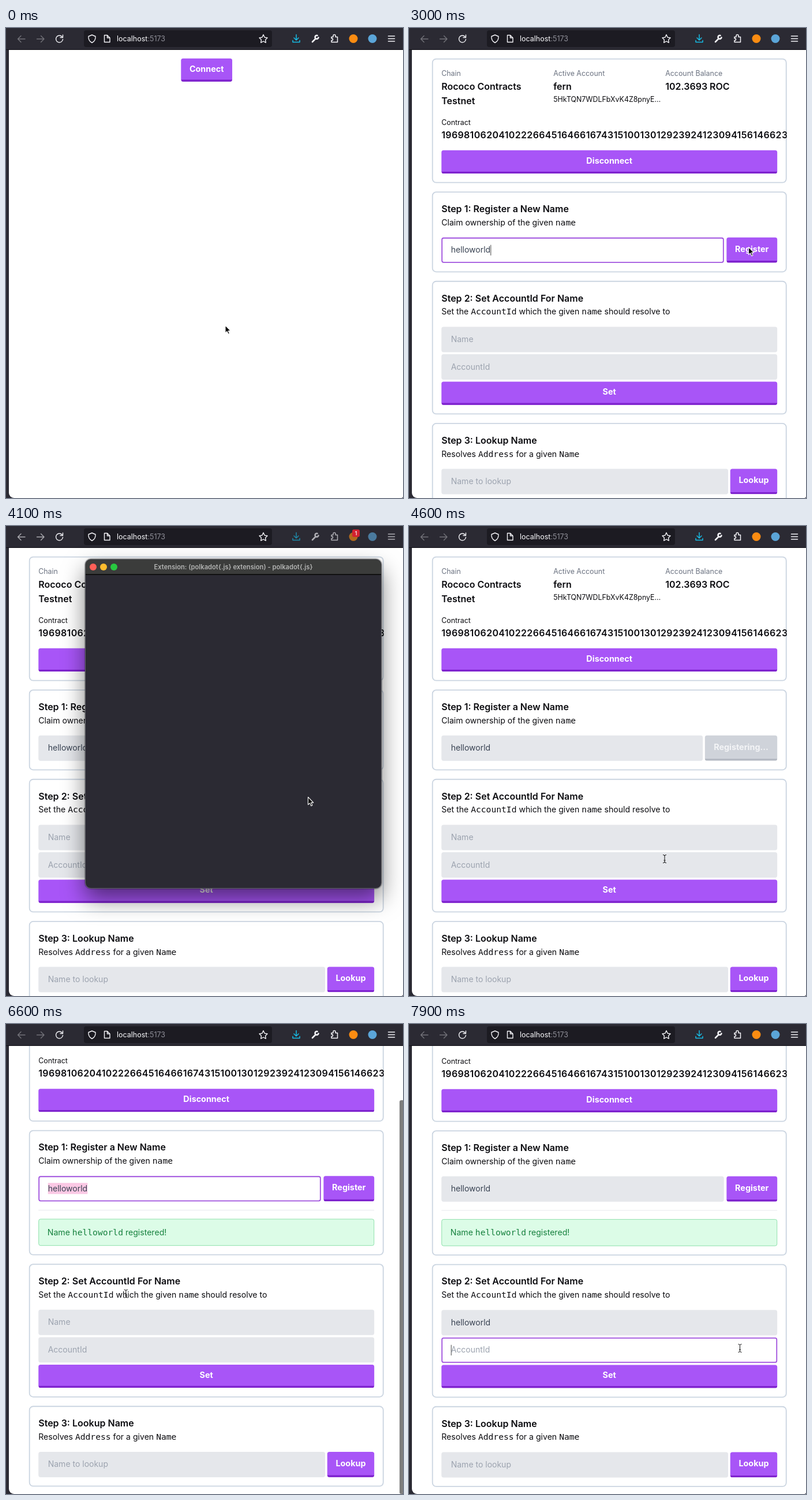
Recreate the animation shown at these times as an HTML page. Size 688 by 814 pixels, loop 8 s.

```html
<!DOCTYPE html>
<html lang="en">
<head>
<meta charset="utf-8">
<title>Name registry demo</title>
<style>
  html, body { margin: 0; width: 100%; height: 100%; overflow: hidden; background: #2b2a33; }
  #stage { position: relative; width: 688px; height: 814px; overflow: hidden; background: #2b2a33;
    font-family: Inter, "Open Sans", sans-serif; cursor: none; }
  #stage div, #stage svg { position: absolute; box-sizing: border-box; }
  .text { line-height: 30px; white-space: nowrap; }
  .mid { transform: translateX(-50%); }
  code { font: 16px/0 "DejaVu Sans Mono", monospace; }
  #bar { left: 0; top: 0; width: 688px; height: 38px; border-bottom: 1px solid #111016; }
  #url { left: 135px; top: 4px; width: 326px; height: 29px; border-radius: 4px; background: #1c1b22; }
  #page { left: 5px; top: 38px; width: 683px; height: 776px; overflow: hidden; background: #fff; border-radius: 0 0 3px 9px; }
  #doc { left: 0; top: 0; width: 748px; height: 0; transform-origin: 0 0; }
  #thumb { right: 0; width: 6px; height: 682px; border-radius: 3px 0 0 3px; background: #7d7d7d; }
  .card { left: 38px; width: 672px; border: 2px solid #cbd5e1; border-radius: 8px; }
  .button { background: #a855f7; border-bottom: 4px solid #7e22ce; border-radius: 4px; color: #fff; }
  .button.busy { background: #cfd3da; border-color: #b5bac3; color: #f3f4f6; }
  .field { left: 56px; height: 48px; background: #e5e7eb; border: 2px solid #e5e7eb; border-radius: 4px; }
  .field.focus { background: #fff; border-color: #a052de; }
  .field .text { left: 16px; top: 7px; font-size: 15.3px; color: #9ca3af; }
  .field .value { color: #374151; }
  .field .marked span { background: #fbc8e4; padding: 1px 0; }
  .caret { display: inline-block; width: 1px; height: 20px; margin-right: -1px; vertical-align: -5px; background: #333; }
  #popup { left: 137px; top: 57px; width: 514px; height: 571px; border-radius: 10px; overflow: hidden;
    background: #2b2a33; border: 1px solid #62646a; }
  #shadow { left: 137px; top: 57px; width: 514px; height: 571px; border-radius: 10px;
    box-shadow: 0 18px 38px rgba(0,0,0,.5), 0 0 2px #000; }
  #title { left: 0; top: 0; width: 100%; height: 27px; background: #3b3c3b; border-bottom: 2px solid #111; }
  .light { width: 12px; height: 12px; border-radius: 50%; top: 7px; }
</style>
</head>
<body>
<div id="stage"></div>
<script>
const INK = '#0b0b0f', GREY = '#6b7280', LOOP = 8000;
const SCALE = .915, RIGHT = 692, SHIFT = 84;
const SMALL = 13.55, BODY = 15.4, HEAD = 17.5;
const stage = document.getElementById('stage');

function box(parent, props = {}, style = {}) {
  const el = Object.assign(document.createElement('div'), props);
  for (const k in style) el.style[k] = typeof style[k] === 'number' ? style[k] + 'px' : style[k];
  return parent.appendChild(el);
}

// y is the middle of the capitals
function text(parent, x, y, size, html, color = INK, weight = 400, mid = false) {
  return box(parent, { className: mid ? 'text mid' : 'text', innerHTML: html },
    { left: x, top: y - 15, fontSize: size, color, fontWeight: String(weight) });
}

const head = (x, y, html) => text(app, x, y, HEAD, html, INK, 600);

function card(parent, top, height, title, note) {
  const el = box(parent, { className: 'card' }, { top, height });
  if (title) {
    text(parent, 56, top + 33, HEAD, title, INK, 600);
    text(parent, 56, top + 58.7, BODY, note);
  }
  return el;
}

function button(parent, left, right, top, height, label) {
  const el = box(parent, { className: 'button' }, { left, top, width: right - left, height });
  const caption = text(el, 0, (height - 4) / 2 + .4, 15.7, label, 'inherit', 700, true);
  caption.style.left = '50%';
  return {
    el,
    set(left, label, busy) {
      el.style.left = left + 'px';
      el.style.width = right - left + 'px';
      el.classList.toggle('busy', busy);
      caption.textContent = label;
    }
  };
}

function field(parent, top, right, hint) {
  const el = box(parent, { className: 'field' }, { top, width: right - 56 });
  const line = box(el, { className: 'text', textContent: hint });
  return {
    el,
    set(value, focus, marked) {
      const caret = focus && !marked ? '<i class="caret"></i>' : '';
      el.classList.toggle('focus', focus);
      line.className = 'text' + (value ? ' value' : '') + (marked ? ' marked' : '');
      line.innerHTML = value ? `<span>${value}</span>${caret}` : caret + hint;
    }
  };
}

function svg(parent, w, h, body) {
  const holder = box(parent, {}, { left: 0, top: 0, width: w, height: h });
  holder.innerHTML = `<svg width="${w}" height="${h}" fill="none" style="overflow:visible">${body}</svg>`;
  return holder;
}

// Browser toolbar
const bar = box(stage, { id: 'bar' });
box(bar, { id: 'url' });
text(bar, 192, 19, 12.5, 'localhost<span style="color:#8f8f98">:5173</span>', '#fbfbfe');
const arrows = svg(bar, 688, 38, `<g stroke="#fbfbfe" stroke-width="1.4" stroke-linecap="round" stroke-linejoin="round">
  <path d="M33 19H20.5M26 13.5L20.5 19L26 24.5M53.5 19H66M60.5 13.5L66 19L60.5 24.5"/></g>`);
svg(bar, 688, 38, `<g stroke="#f4f4f8" stroke-width="1.4" stroke-linecap="round" stroke-linejoin="round">
  <path d="M97 15A6 6 0 1 0 98.5 19.5M98.5 12V16.5H94"/>
  <path d="M149 12L155 14.5C155.5 20 153 23.5 149 25.5C145 23.5 142.5 20 143 14.5Z"/>
  <path d="M170.5 12.5H175.5L180 17V24.5H170.5ZM175.5 12.5V17H180"/>
  <path d="M446 11.5L448.2 16.2L453 16.9L449.5 20.4L450.3 25.3L446 23L441.7 25.3L442.5 20.4L439 16.9L443.8 16.2Z"/></g>`);
const tools = svg(bar, 688, 38, `<g stroke="#f4f4f8" stroke-width="1.5" stroke-linecap="round" stroke-linejoin="round">
  <path stroke="#17bde6" d="M503 11.5V20.5M499 17L503 21L507 17M497 21.5V24.5H509V21.5"/>
  <path stroke-width="2.6" d="M531 24L536.5 18.5M539.5 13A3 3 0 1 0 541.5 16.5"/>
  <path d="M564 15.5H567V13.5A2 2 0 0 1 571 13.5V15.5H574.5V24.5H564V21.5H565.5A2 2 0 0 0 565.5 18H564Z"/>
  <path d="M662.5 14H673.5M662.5 18.5H673.5M662.5 23H673.5"/></g>
  <circle cx="602" cy="18.5" r="7.5" fill="#fb8c12"/><circle cx="635" cy="18.5" r="7.5" fill="#5ba5d8"/>`);
const badge = box(bar, {}, { left: 600, top: 6, width: 13, height: 13, borderRadius: '3px', background: '#d32230' });
text(badge, 6.5, 6.5, 9.5, '1', '#fff', 500, true);

// Web page, laid out in its own pixels and scaled down
const page = box(stage, { id: 'page' });
const doc = box(page, { id: 'doc' });
const thumb = box(page, { id: 'thumb' });
const connect = button(doc, 326, 423, 16, 44, 'Connect');
const app = box(doc);

card(app, 16, 236);
text(app, 56, 44.3, SMALL, 'Chain', GREY);
head(56, 69, 'Rococo Contracts');
head(56, 97, 'Testnet');
text(app, 268, 44.3, SMALL, 'Active Account', GREY);
head(268, 69, 'fern');
text(app, 268, 92.8, SMALL, '5HkTQN7WDLFbXvK4Z8pnyE…');
text(app, 480, 44.3, SMALL, 'Account Balance', GREY);
const balance = head(480, 69, '');
text(app, 56, 136.6, SMALL, 'Contract');
const id = head(56, 161, '1969810620410222664516466167431510013012923924123094156146623');
Object.assign(id.style, { width: '654px', overflow: 'hidden', letterSpacing: '.02em' });
button(app, 56, RIGHT, 190, 44, 'Disconnect');

const registerCard = card(app, 268, 153, 'Step 1: Register a New Name',
  'Claim ownership of the given <code>name</code>');
const nameField = field(app, 355, 591, 'Name to register');
const register = button(app, 596, RIGHT, 355, 48, 'Register');

const notice = box(app);
box(notice, {}, { left: 56, top: 419, width: 636, height: 1, background: '#e5e7eb' });
box(notice, {}, { left: 56, top: 436, width: 636, height: 51, borderRadius: '4px',
  background: '#dcfce7', border: '1px solid #86dfa6' });
text(notice, 73, 461.5, BODY, 'Name <code>helloworld</code> registered!', '#15803d');

const tail = box(app);
card(tail, 437, 253, 'Step 2: Set AccountId For Name',
  'Set the <code>AccountId</code> which the given <code>name</code> should resolve to');
const setName = field(tail, 524, RIGHT, 'Name');
const setId = field(tail, 576, RIGHT, 'AccountId');
button(tail, 56, RIGHT, 628, 44, 'Set');
card(tail, 706, 153, 'Step 3: Lookup Name', 'Resolves <code>Address</code> for a given <code>Name</code>');
field(tail, 793, 599, 'Name to lookup');
button(tail, 603, RIGHT, 793, 48, 'Lookup');

// Extension window
const shadow = box(stage, { id: 'shadow' });
const popup = box(stage, { id: 'popup' });
const title = box(popup, { id: 'title' });
['#ff5f57', '#febc2e', '#28c840'].forEach((background, i) =>
  box(title, { className: 'light' }, { left: 6.5 + i * 18.3, background }));
text(title, 256, 13, 11.2, 'Extension: (polkadot{.js} extension) - polkadot{.js}', '#b4b5b4', 600, true);

// Pointer
const ring = svg(stage, 1, 1, '<circle r="15" stroke="#111" stroke-width="1.7"/>');
const arrow = svg(stage, 1, 1, `<path d="M0 0V13.2L3 10.4L5.3 15.3L7.4 14.3L5.2 9.6H9.3Z"
  fill="#000" stroke="#fff" stroke-width="1.1" stroke-linejoin="round"/>`);
const beam = svg(stage, 1, 1, `<path d="M-3 -7.5Q0 -7.5 0 -5.5Q0 -7.5 3 -7.5M0 -5.5V4.5M-3 6.5Q0 6.5 0 4.5Q0 6.5 3 6.5M-1.5 2H1.5"
  stroke="#111"/>`);

// time, x, y, shape
const path = [
  [0, 380, 515, arrow], [100, 380, 515, arrow], [500, 350, 76, arrow], [1500, 340, 78, arrow],
  [1600, 277, 202, beam], [1900, 238, 384, beam], [2500, 238, 384, beam], [2900, 560, 380, arrow],
  [3100, 617, 379, arrow], [3900, 617, 379, arrow], [4300, 430, 560, arrow], [4400, 443, 577, beam],
  [4900, 443, 577, beam], [5200, 227, 358, beam], [6200, 227, 358, beam], [6700, 203, 495, beam],
  [7200, 203, 495, beam], [7700, 573.5, 562, beam], [LOOP, 573.5, 562, beam]
];
const scrolls = [[0, 0], [5000, 0], [5200, 22.5], [6200, 22.5], [6600, 99.5], [7000, 99.5], [7100, 99], [LOOP, 99]];
const fades = [[0, 0], [5000, 0], [5100, 1], [5300, 1], [5500, .08], [5600, 0], [6200, 0], [6300, 1], [7000, 1], [7300, 0], [LOOP, 0]];
const clicks = [600, 1900, 3200, 4300, 5200, 6800, 7700];

function at(keys, t, col = 1) {
  const i = keys.findIndex(k => k[0] > t);
  const a = keys[i - 1], b = keys[i];
  return a[col] + (b[col] - a[col]) * (t - a[0]) / (b[0] - a[0]);
}

const within = (t, from, to) => t >= from && t < to;
const show = (el, on) => { el.style.display = on ? '' : 'none'; };

function draw(t) {
  const online = t >= 800, busy = within(t, 3200, 5000), done = t >= 5000;
  const open = within(t, 3400, 4400);
  const typed = 'helloworld'.slice(0, Math.max(0, Math.ceil((t - 2200) / 60)));

  show(connect.el, !online);
  show(app, online);
  show(notice, done);
  [shadow, popup, badge].forEach(el => show(el, open));
  arrows.style.opacity = open ? .62 : .34;
  tools.style.opacity = open ? .65 : 1;

  balance.textContent = done ? '102.3686 ROC' : '102.3693 ROC';
  registerCard.style.height = 153 + (done ? SHIFT : 0) + 'px';
  tail.style.top = (done ? SHIFT : 0) + 'px';
  nameField.el.style.width = (busy ? 551 : 591) - 56 + 'px';
  register.set(busy ? 555 : 596, busy ? 'Registering…' : 'Register', busy);
  nameField.set(typed, within(t, 1900, 3200) || within(t, 5200, 6800), within(t, 5300, 6800));
  setName.set(t >= 7300 ? 'helloworld' : '', within(t, 6800, 7700));
  setId.set('', t >= 7700);

  const scroll = at(scrolls, t);
  doc.style.transform = `translateY(${-scroll}px) scale(${SCALE})`;
  thumb.style.top = 2 + scroll * .92 + 'px';
  thumb.style.opacity = at(fades, t);

  const x = at(path, t, 1), y = at(path, t, 2);
  const shape = path.filter(k => k[0] <= t).pop()[3];
  [arrow, beam, ring].forEach(el => { el.style.transform = `translate(${x}px, ${y}px)`; });
  show(arrow, shape === arrow);
  show(beam, shape === beam);
  show(ring, clicks.some(c => within(t, c, c + 200)));
}

const start = performance.now();
let last = -1;
function tick() {
  const t = Math.floor((performance.now() - start) % LOOP / 100) * 100;
  if (t !== last) draw(last = t);
  requestAnimationFrame(tick);
}
tick();
</script>
</body>
</html>
```
